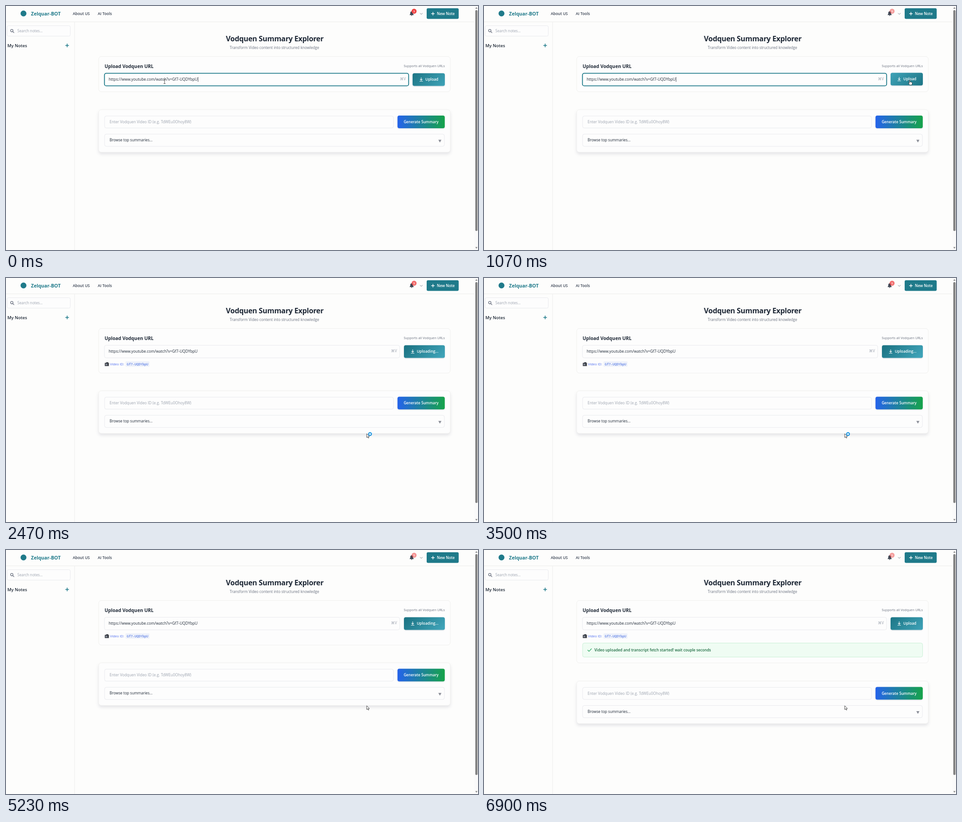
Write an HTML page that moves like this. It is 1039 px wide and 539 px high and loops after 6930 ms.

```html
<!DOCTYPE html>
<html lang="en">
<head>
<meta charset="utf-8">
<title>Summary Explorer</title>
<style>
  html, body { margin: 0; height: 100%; overflow: hidden; background: #fdfdfc; }
  svg { display: block; width: 1039px; height: 539px; font: 8.2px "Open Sans", "Noto Sans", "DejaVu Sans", sans-serif; fill: #1f2937; }
  .semi { font-weight: 600; }
  .bold { font-weight: 700; }
  .white { fill: #fff; }
  .muted { fill: #9ca3af; }
  .gray { fill: #6b7280; }
  .teal { fill: #1f7a8a; }
  .line { fill: none; stroke: #ececea; }
  .field { fill: #fdfdfd; stroke: #e9eaee; }
  .field.focus { stroke: #1f7a8a; stroke-width: 1.8; }
  .card { fill: #fdfdfd; stroke: #f0f0ee; }
  .raised { filter: drop-shadow(0 4px 3px rgba(40, 40, 70, .11)); }
  .button { filter: drop-shadow(0 1px 1.2px rgba(30, 60, 90, .2)); }
  .stroke { fill: none; stroke: currentColor; stroke-linecap: round; stroke-linejoin: round; }
</style>
</head>
<body>
<svg viewBox="0 0 1039 539">
  <defs>
    <linearGradient id="rest" gradientUnits="userSpaceOnUse" x1="-25" y1="-25" x2="25" y2="25">
      <stop stop-color="#1d7585"/><stop offset="1" stop-color="#3fa3b8"/>
    </linearGradient>
    <linearGradient id="hover" gradientUnits="userSpaceOnUse" x1="-25" y1="-25" x2="25" y2="25">
      <stop stop-color="#3fa3b8"/><stop offset="1" stop-color="#1d7585"/>
    </linearGradient>
    <linearGradient id="generate" gradientUnits="userSpaceOnUse" x1="-52" y1="0" x2="52" y2="0">
      <stop stop-color="#2563eb"/><stop offset="1" stop-color="#16a34a"/>
    </linearGradient>
  </defs>

  <!-- header -->
  <path class="line" d="M0 35H1031M151 35V539"/>
  <circle class="teal" cx="38.5" cy="16.5" r="6.5"/>
  <text class="bold teal" x="55" y="21" font-size="10.6">Zelquar-BOT</text>
  <g class="semi" fill="#374151" font-size="8.4">
    <text x="147" y="20">About US</text>
    <text x="202" y="20">AI Tools</text>
  </g>
  <path fill="#3f4754" d="M893 11.5c-2.6.6-3.1 2.5-3.1 5 0 1.6-.9 2.5-1.7 3.4h9.7c-.8-.9-1.7-1.8-1.7-3.4 0-2.5-.6-4.4-3.2-5zM891.6 20.6h2.8a1.4 1.4 0 0 1-2.8 0z"/>
  <g id="badge">
    <circle cx="898.3" cy="11.5" r="5.5" fill="#ef4444"/>
    <text class="semi white" x="898.3" y="13.7" font-size="6" text-anchor="middle">3</text>
  </g>
  <path class="stroke" color="#7b828e" d="M911.7 16l2.5 2.5 2.5-2.5"/>
  <rect class="teal" x="926" y="5" width="70.5" height="23.5" rx="3"/>
  <path class="stroke" color="#fff" stroke-width="1.3" d="M936.5 17h6.5M939.8 13.7v6.6"/>
  <text class="semi white" x="948.5" y="20">New Note</text>

  <!-- sidebar -->
  <rect class="field" x="2.5" y="43.5" width="139" height="23" rx="3"/>
  <g class="stroke" color="#6b7280" stroke-width="1.3"><circle cx="12.8" cy="54.3" r="2.7"/><path d="M15 56.5l2.5 2.5"/></g>
  <text class="muted" x="25" y="58">Search notes...</text>
  <text class="semi" x="3" y="91" font-size="9.5">My Notes</text>
  <path class="stroke" color="#1f7a8a" stroke-width="1.6" d="M131.3 87.2h6.6M134.6 83.9v6.6"/>

  <!-- heading -->
  <text class="bold" x="591.5" y="77.5" font-size="16" letter-spacing="-.32" text-anchor="middle">Vodquen Summary Explorer</text>
  <text class="gray" x="591" y="94.5" text-anchor="middle">Transform Video content into structured knowledge</text>

  <!-- upload card -->
  <rect id="uploadCard" class="card" x="204" y="111.5" width="774" rx="6"/>
  <text class="bold" x="217" y="136.7" font-size="10.3">Upload Vodquen URL</text>
  <text class="gray" x="966" y="135" font-size="7.2" text-anchor="end">Supports all Vodquen URLs</text>
  <rect id="urlField" x="216.7" y="148.6" height="27.8" rx="4"/>
  <text x="226" y="165.3" font-size="8.35">https://www.youtube.com/watch?v=Gf7-UQDYbpU</text>
  <path id="caret" stroke="#111827" stroke-width=".8" d="M422.8 157v10.5"/>
  <text id="shortcut" class="muted" y="163.5" text-anchor="end">⌘V</text>
  <g id="upload">
    <rect class="button" y="-14" height="28" rx="4"/>
    <g id="uploadLabel">
      <path class="stroke" color="#fff" stroke-width="1.1" d="M-16.5-4V1.5M-18.7-.5l2.2 2.2 2.2-2.2M-19.7 3.8h6.4"/>
      <text class="semi white" x="-7.5" y="3" font-size="8.3"></text>
    </g>
  </g>
  <g id="videoId">
    <path fill="#3c4048" d="M217.5 187.5h2l2-1.500h3l1 1.500h1v7h-9z"/>
    <path fill="#8d94a0" d="M219 189.5h4v3h-4z"/>
    <text x="229" y="193" font-size="7.45" fill="#4f6ef0">Video ID:</text>
    <rect x="263" y="184" width="53" height="12" rx="2" fill="#eff2fa"/>
    <text x="266" y="192.7" fill="#3762e0" style="font: 7.12px 'Noto Sans Mono', monospace">Gf7-UQDYbpU</text>
  </g>
  <g id="success">
    <rect x="217" y="205.5" width="748.5" height="31" rx="4" fill="#effcf3" stroke="#c9f0d6"/>
    <path class="stroke" color="#22a55a" stroke-width="1.3" d="M228.5 221.2l2.7 2.7 5.3-5.8"/>
    <text class="semi" x="243" y="223.7" fill="#1b6a40">Video uploaded and transcript fetch started! wait couple seconds</text>
  </g>

  <!-- summary card -->
  <g id="summary">
    <rect class="card raised" x="204" y="229" width="774" height="94" rx="6"/>
    <rect class="field" x="217" y="243" width="636" height="26.5" rx="4"/>
    <text class="muted" x="228" y="259.2" font-size="8.33">Enter Vodquen Video ID (e.g. TdWEu0Ohoy8W)</text>
    <g transform="translate(913.8 256)">
      <rect class="button" x="-52" y="-14" width="104" height="28" rx="4" fill="url(#generate)"/>
      <text class="semi white" y="3" text-anchor="middle">Generate Summary</text>
    </g>
    <rect class="field" x="217" y="283" width="748" height="27" rx="4"/>
    <text x="228" y="299.2">Browse top summaries...</text>
    <path fill="#8a8d97" d="M951.7 295.5h6.8l-3.4 6z"/>
  </g>

  <!-- scrollbar -->
  <path fill="#fafafa" d="M1031 0h8v539h-8z"/>
  <rect x="1033" y="9" width="5" height="488" rx="2.5" fill="#858585"/>
  <path fill="#858585" d="M1033 6h5l-2.5-3.5zM1033 532.5h5l-2.5 3.5z"/>

  <!-- pointer shapes -->
  <g id="pointer" stroke-linejoin="round">
    <path id="beam" class="stroke" color="#222" stroke-width=".8" d="M-1.8-4.5h1.3l.5.5.5-.5h1.3M0-4v8M-1.8 4.5h1.3l.5-.5.5.5h1.3"/>
    <path id="hand" fill="#fff" stroke="#222" stroke-width=".8" d="M-.8 0q.8-1 1.6 0v3.7l4 .9q1 .3.8 1.5l-.7 4.4H.3L-2.7 6.8q.1-1.3 1.9-.2z"/>
    <path id="arrow" fill="#fff" stroke="#222" stroke-width=".8" d="M0 0V8.5l2-1.8 1.4 3 1.4-.6L3.5 6.2H6z"/>
    <circle id="spinner" cx="7.3" cy=".7" r="3.1" fill="#fff" stroke="#1e96e0" stroke-width="2.2"/>
  </g>
</svg>
<script>
const LOOP = 6930, CLICK = 1430, IDLE = 4800, DONE = 5330;
const $ = id => document.getElementById(id);
const set = (el, attrs) => { for (const key in attrs) el.setAttribute(key, attrs[key]); };
const show = (id, on) => set($(id), { visibility: on ? 'visible' : 'hidden' });
const clamp = x => Math.min(1, Math.max(0, x));
const smooth = x => x * x * (3 - 2 * x);

// Pointer stops: [time, x, y]
const stops = [[0, 349, 167], [120, 349, 167], [800, 937, 164], [CLICK, 937, 164],
  [CLICK + 60, 935, 165], [1800, 935, 165], [2100, 794, 344], [LOOP, 794, 344]];

function pointerAt(t) {
  const i = Math.max(1, stops.findIndex(stop => stop[0] > t));
  const [t0, x0, y0] = stops[i - 1], [t1, x1, y1] = stops[i];
  const k = smooth(clamp((t - t0) / (t1 - t0)));
  return [x0 + (x1 - x0) * k, y0 + (y1 - y0) * k];
}

// cubic-bezier(.4, 0, .6, 1) solved by bisection
function pulseEase(x) {
  let lo = 0, hi = 1, s = .5;
  for (let i = 0; i < 14; i++) {
    s = (lo + hi) / 2;
    const at = 1.2 * s * (1 - s) ** 2 + 1.8 * s * s * (1 - s) + s ** 3;
    if (at < x) lo = s; else hi = s;
  }
  return smooth(s);
}

function render(t) {
  const clicked = t >= CLICK, done = t >= DONE, busy = clicked && !done;
  const left = busy ? 876 : 895, width = 966 - left;
  const [x, y] = pointerAt(t);
  const over = x >= left && x <= 966 && y >= 148 && y <= 176;

  set($('uploadCard'), { height: done ? 138 : clicked ? 98.5 : 78 });
  set($('summary'), { transform: `translate(0 ${done ? 60.5 : clicked ? 20.2 : 0})` });
  set($('urlField'), { width: busy ? 650 : 669.6, class: clicked ? 'field' : 'field focus' });
  set($('shortcut'), { x: busy ? 860.5 : 880 });
  show('caret', !clicked && !(t > 300 && t < 800));
  show('videoId', clicked);
  show('success', done);

  set($('upload'), { transform: `translate(${left + width / 2} ${over ? 161.4 : 162.4})` });
  set($('upload').firstElementChild, { x: -width / 2, width, fill: `url(#${over ? 'hover' : 'rest'})` });
  set($('uploadLabel'), { transform: `translate(${busy ? -9.3 : 0} 0)` });
  $('uploadLabel').lastElementChild.textContent = busy ? 'Uploading...' : 'Upload';

  const phase = t % 2000 / 1000;
  set($('badge'), { opacity: phase < 1 ? 1 - pulseEase(phase) / 2 : .5 + pulseEase(phase - 1) / 2 });

  const shape = clicked ? 'arrow' : over ? 'hand' : x < 886 ? 'beam' : 'arrow';
  for (const id of ['beam', 'hand', 'arrow']) show(id, id === shape);
  show('spinner', clicked && t < IDLE);
  set($('pointer'), { transform: `translate(${x} ${y})` });
}

function frame() {
  render(performance.now() % LOOP);
  requestAnimationFrame(frame);
}
frame();
</script>
</body>
</html>
```
